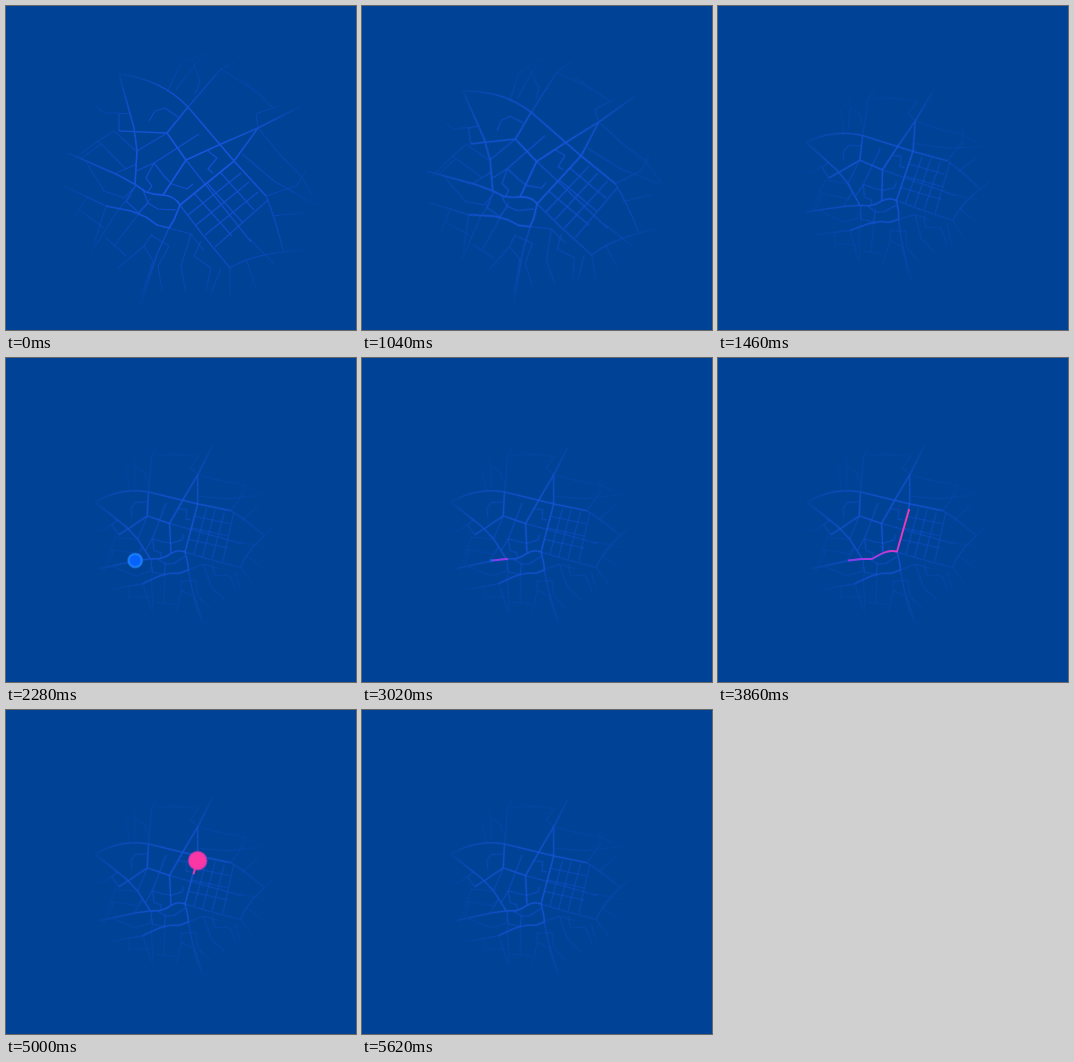
Write an HTML page that moves like this. It is 350 px wide and 324 px high and loops after 8000 ms.

```html
<!DOCTYPE html>
<html lang="en">
<head>
<meta charset="utf-8">
<title>City route</title>
<style>
  html, body { margin: 0; width: 100%; height: 100%; overflow: hidden; background: #004296; }
  svg { display: block; width: 350px; height: 324px; }
  path { fill: none; stroke-linejoin: round; }
  .main { stroke: #1655dc; stroke-width: 1.75; }
  .mid { stroke: #114fce; stroke-width: 1.25; }
  .thin { stroke: #0d4bbf; stroke-width: 1.1; }
</style>
</head>
<body>
<svg viewBox="0 0 350 324">
  <defs>
    <radialGradient id="fade" gradientUnits="userSpaceOnUse" cx="185" cy="177" r="140">
      <stop offset=".25" stop-color="#fff"/>
      <stop offset=".7" stop-color="#fff" stop-opacity=".65"/>
      <stop offset="1" stop-color="#fff" stop-opacity="0"/>
    </radialGradient>
    <mask id="disc" maskUnits="userSpaceOnUse" x="40" y="30" width="290" height="290">
      <rect x="40" y="30" width="290" height="290" fill="url(#fade)"/>
    </mask>
    <linearGradient id="heat" gradientUnits="userSpaceOnUse" x1="130" y1="202" x2="191" y2="165">
      <stop stop-color="#7d3fee"/>
      <stop offset=".65" stop-color="#d838c8"/>
      <stop offset="1" stop-color="#ff36a4"/>
    </linearGradient>
  </defs>

  <g id="map">
    <g transform="translate(-174 -199)">
      <g mask="url(#disc)">
        <path class="thin" d="M200 45L180 70L170 84M161 86L176 56L205 46M188 58L194 76L189 88
          M215 63L250 85L268 103M235 70L250 88M252 122L250 108L272 100
          M252 122L275 150L295 170L310 197M236 148L268 175L312 200M260 190L290 180L300 165
          M265 210L297 207M85 95L98 107H113M130 145L108 125L92 135L65 155M92 135L120 163L131 158
          M75 152L95 138M108 168L130 158M80 156L98 185L118 192L130 180
          M68 212L82 190M85 247L112 204L125 190M108 240L131 210L145 192M98 222L75 205M88 238L100 200
          M100 232L120 250M145 229L163 240L152 260L156 285M135 290L147 255L138 240L146 228
          M112 262L138 240M185 228L175 260L180 287M195 235L188 250L205 262L200 285
          M215 262L205 288M224 262V290M240 253L250 282M243 232L268 258M163 222L185 228L198 245"/>
        <path class="mid" d="M182 101L215 63L235 52M143 115L149 105L159 102L172 111M113 125V108L125 107
          M130 165L148 157L193 128M131 145L161 127M148 157L158 170L166 178L181 183L187 178
          M148 157L140 172L146 180L141 187M202 145L211 152L202 163L207 167
          M180 154L245 236M188 187L226 230M201 177L236 216M214 166L248 204
          M182 209L235 167M190 219L243 176M199 229L252 186M209 241L262 194
          M130 179L120 195L135 209M137 184L142 197L152 203L170 204M142 197L131 208"/>
        <path class="mid" d="M163 222L151 248L134 300M174 199L196 228L224 262C241 251 265 246 297 244
          M58 180L100 200L125 205M260 190Q269 211 277 244"/>
        <path class="main" d="M113 68C138 71 162 80 182 101L228 155L260 190
          M62 147L112 169L130 179L140 186Q148 189 157 189Q169 190 174 199
          M113 68L128 122L131 145L129 178M174 199L228 155L252 122L295 100
          M180 154L215 138L252 122M113 125L161 127L180 154L157 189M182 101L161 127
          M174 199L168 214L163 222L151 219L140 211L125 205L100 200"/>
      </g>
    </g>
  </g>

  <path id="route" pathLength="100" stroke="url(#heat)" stroke-width="1.8"
    d="M130 202.5L144 201L154 201Q160 197 165 195Q172 192 179 193.5L191.3 151"/>
  <g id="start"><circle r="8.4" fill="#0662fb" stroke="#1f88ff" stroke-width="2.2"/></g>
  <g id="goal"><circle r="8.6" fill="#fb37a5" stroke="#ea39ad" stroke-width="1.8"/></g>
</svg>
<script>
  const LOOP = 8000;
  const CUBIC = 'cubic-bezier(.65,0,.35,1)';

  // steps: [time in ms, value, easing towards the next step]
  function play(id, prop, steps) {
    const frames = steps.map(([ms, value, easing = 'linear']) =>
      ({ offset: ms / LOOP, [prop]: value, easing }));
    document.getElementById(id).animate(frames, { duration: LOOP, iterations: Infinity });
  }

  const pose = (x, y, turn, size) =>
    `translate(${x}px, ${y}px) rotate(${turn}deg) scale(${size})`;

  function pop(id, x, y, begin) {
    const at = size => pose(x, y, 0, size);
    play(id, 'transform', [
      [0, at(0)],
      [begin, at(0), 'cubic-bezier(.3,0,.5,1)'],
      [begin + 630, at(1), 'cubic-bezier(.5,0,.7,1)'],
      [begin + 1260, at(0)],
      [LOOP, at(0)]
    ]);
  }

  const near = pose(174, 199, 0, 1);
  const far = pose(179, 194, -36, .714);
  play('map', 'transform', [
    [0, near],
    [240, near, 'cubic-bezier(.85,0,.4,1)'],
    [1880, far],
    [LOOP, far]
  ]);

  document.getElementById('route').style.strokeDasharray = '100 200';
  play('route', 'strokeDashoffset', [
    [0, '101'],
    [2540, '101', CUBIC],
    [3900, '0'],
    [4100, '0', CUBIC],
    [5460, '-101'],
    [LOOP, '-101']
  ]);

  pop('start', 129.2, 202.5, 1885);
  pop('goal', 191.6, 150.6, 4360);
</script>
</body>
</html>
```
